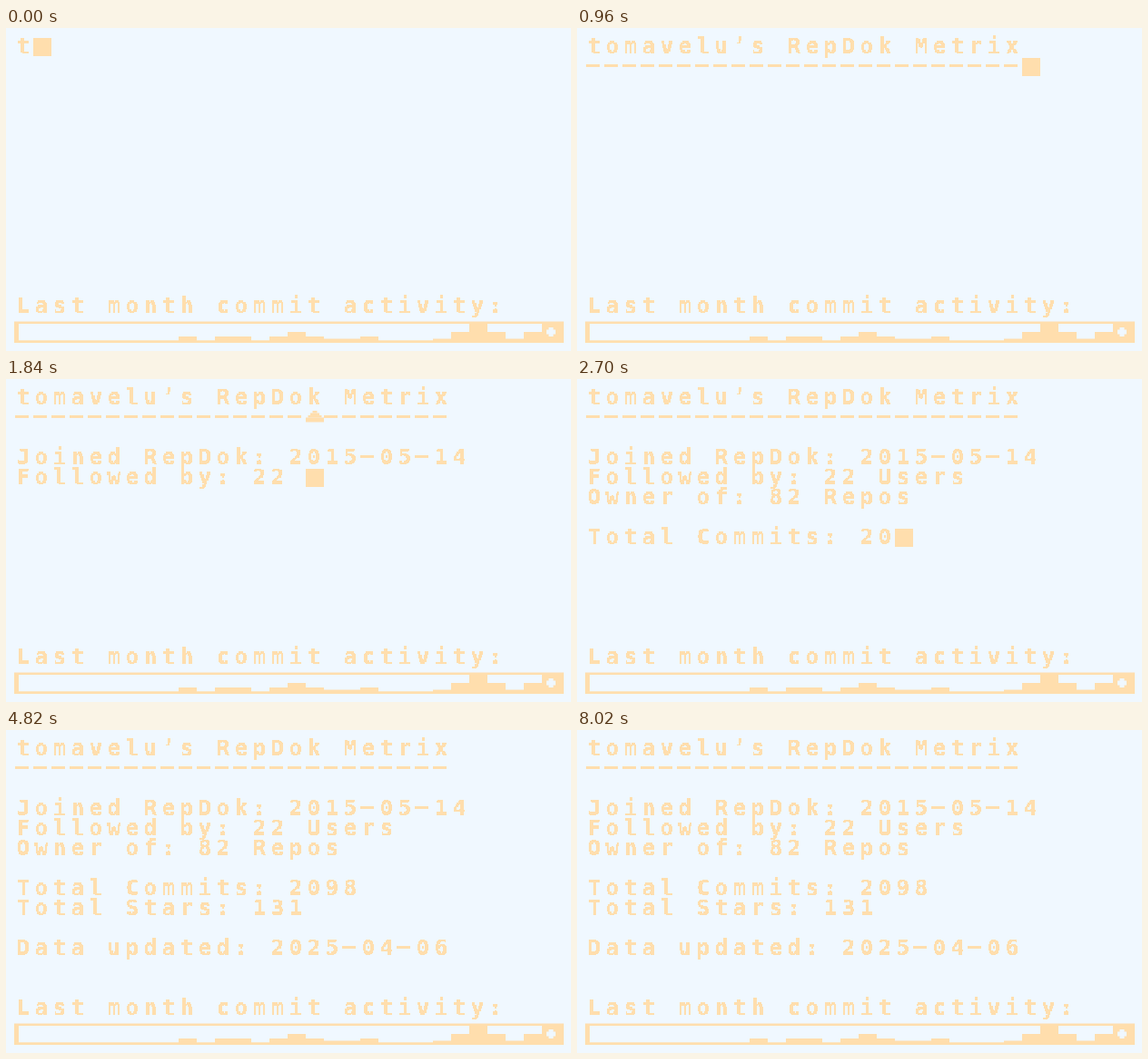
An HTML page with a canvas that plays this animation: 622 px wide and 356 px high, repeating every 8420 ms.

```html
<!DOCTYPE html>
<html lang="en">
<head>
<meta charset="utf-8">
<title>Commit activity</title>
<style>
  html, body { margin: 0; width: 100%; height: 100%; overflow: hidden; background: #f0f8ff; }
  canvas { display: block; }
</style>
</head>
<body>
<canvas id="stage" width="622" height="356"></canvas>
<script>
const LOOP = 8420, STEP = 20, BLINK_START = 4020, BLINK = 400;
const BG = '#f0f8ff', INK = '#ffdead';
const CELL = 20, LINE = 22, LEFT = 10, TOP = 11, DOT = 2.5;
const TEXT = [
  'tomavelu’s RepDok Metrix',
  '-'.repeat(24),
  '',
  'Joined RepDok: 2015-05-14',
  'Followed by: 22 Users',
  'Owner of: 82 Repos',
  '',
  'Total Commits: 2098',
  'Total Stars: 131',
  '',
  'Data updated: 2025-04-06'
];
const LABEL = 'Last month commit activity:', LABEL_ROW = 13;
const LEVELS = '000000000202202321120001343134';
const LEVEL_TOP = [344.5, 342.5, 340, 335, 324];
const MARKER_ROW = 4;

const ctx = document.getElementById('stage').getContext('2d');
ctx.imageSmoothingEnabled = false;

// Text is set once on a coarser grid, then hardened into a pixel face.
const ZOOM = DOT / 2, SLICE = 26, BASE = 18;
const sheet = makeSheet();

function makeSheet() {
  const c = document.createElement('canvas');
  c.width = 498;
  c.height = SLICE * (LABEL_ROW + 1);
  const g = c.getContext('2d');
  g.font = 'bold 20px "DejaVu Sans Mono", monospace';
  g.textAlign = 'center';
  g.fillStyle = INK;
  const setLine = (line, row) => [...line].forEach((ch, col) => {
    const x = (LEFT + col * CELL) / ZOOM, y = row * SLICE + BASE;
    if (ch === '-') g.fillRect(x, y - 8, 12, 2);
    else g.fillText(ch, x + 7, y);
  });
  TEXT.forEach(setLine);
  setLine(LABEL, LABEL_ROW);

  const img = g.getImageData(0, 0, c.width, c.height), d = img.data;
  for (let i = 0; i < d.length; i += 4) {
    const solid = d[i + 3] > 110;
    [d[i], d[i + 1], d[i + 2], d[i + 3]] = solid ? [255, 222, 173, 255] : [0, 0, 0, 0];
  }
  g.putImageData(img, 0, 0);
  return c;
}

function rect(color, x, y, w, h) {
  ctx.fillStyle = color;
  ctx.fillRect(x, y, w, h);
}

function showLine(row, chars) {
  if (!chars) return;
  const w = (LEFT + chars * CELL) / ZOOM, y = 28 + row * LINE - BASE * ZOOM;
  ctx.drawImage(sheet, 0, row * SLICE, w, SLICE, 0, y, w * ZOOM, SLICE * ZOOM);
}

function drawChart() {
  rect(INK, 9, 323.5, 605, 23.5);
  rect(BG, 14, 326, 596, 18.5);
  [...LEVELS].forEach((n, i) => rect(INK, LEFT + i * CELL, LEVEL_TOP[n], CELL, 345 - LEVEL_TOP[n]));
  rect(BG, 595, 332.5, 10, 5);
  rect(BG, 597.5, 330, 5, 10);
}

function drawMarker(col) {
  const x = LEFT + col * CELL;
  rect(BG, x, 33, CELL, CELL);
  for (let k = 0; k < 5; k++) {
    const w = Math.min(CELL, 2 * DOT * (k + 1));
    rect(INK, x + (CELL - w) / 2, 35 + DOT * k, w, DOT);
  }
}

function draw(t) {
  rect(BG, 0, 0, 622, 356);
  showLine(LABEL_ROW, LABEL.length);
  drawChart();

  // Each line break takes one typing step too.
  let left = Math.floor(t / STEP) + 1, row = 0;
  while (row < TEXT.length - 1 && left > TEXT[row].length) {
    showLine(row, TEXT[row].length);
    left -= TEXT[row].length + 1;
    row++;
  }
  const col = Math.min(left, TEXT[row].length);
  showLine(row, col);

  if (row === MARKER_ROW) drawMarker(col);
  const hidden = t >= BLINK_START && Math.floor((t - BLINK_START) / BLINK) % 2 === 0;
  if (!hidden) rect(INK, LEFT + col * CELL, TOP + row * LINE, CELL, CELL);
}

const start = performance.now();
function tick() {
  draw((performance.now() - start) % LOOP);
  requestAnimationFrame(tick);
}
tick();
</script>
</body>
</html>
```
